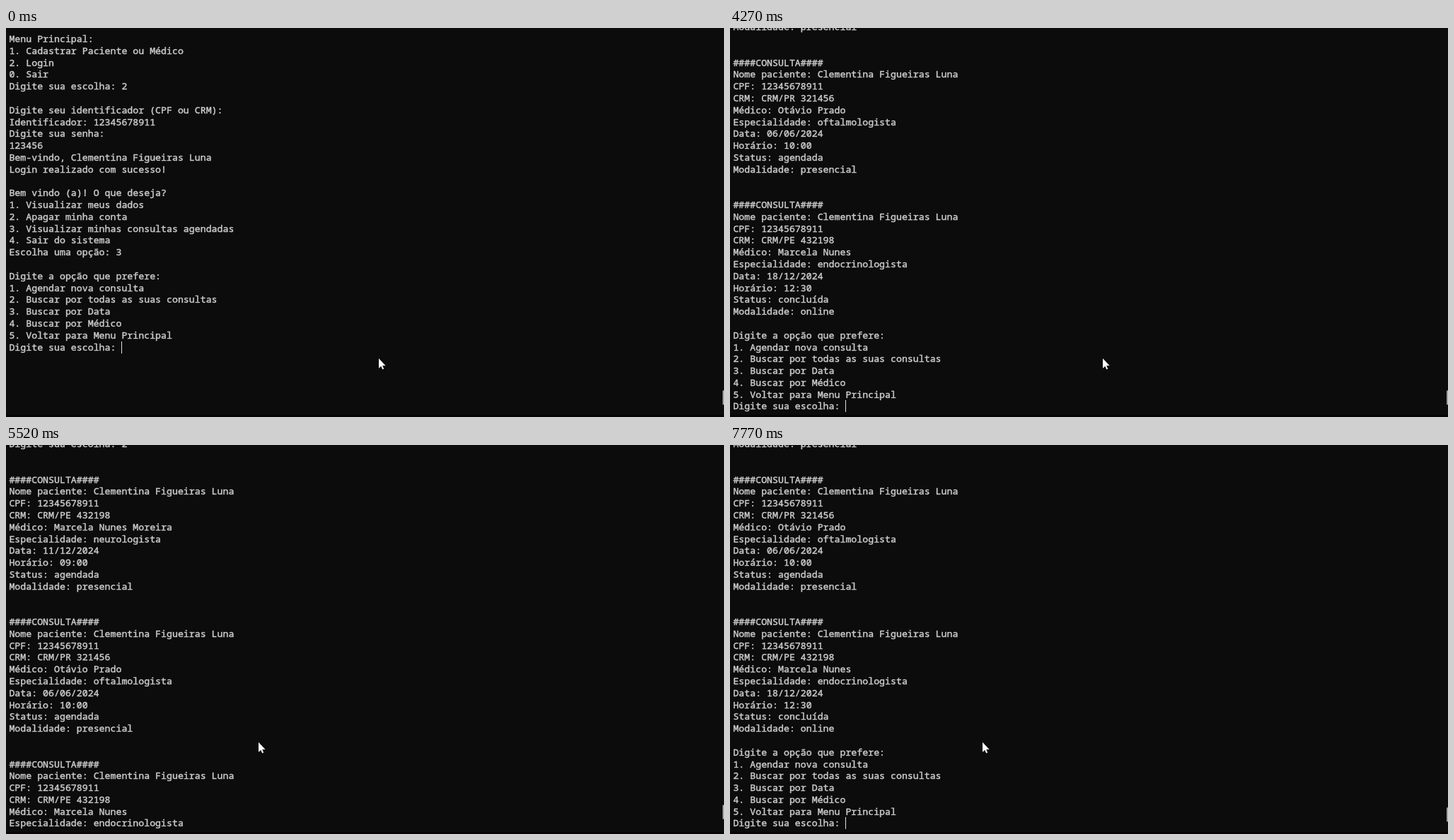
Write an HTML page with a canvas that moves like this. It is 1015 by 551 pixels and loops after 8000 ms.

```html
<!DOCTYPE html>
<html lang="pt-BR">
<head>
<meta charset="utf-8">
<title>Terminal</title>
<style>
  html, body { margin: 0; width: 100%; height: 100%; overflow: hidden; background: #0c0c0c; }
  canvas { display: block; }
</style>
</head>
<body>
<canvas id="stage" width="1015" height="551"></canvas>
<script>
const canvas = document.getElementById('stage');
const ctx = canvas.getContext('2d');
const LOOP = 8000;
const LEFT = 4.4, TOP = 7, ROW = 16.79, CELL = 7.95, BASELINE = 13;
const ROWS = 32;
const PROMPT = 'Digite sua escolha: ';

// Key moments in ms
const TYPED = 1690, LISTED = 3070, MOVED = 4270, WHEEL_UP = 4930, WHEEL_DOWN = 6500;

const patient = 'Clementina Figueiras Luna';
const cpf = '12345678911';

const options = [
  'Digite a opção que prefere:',
  '1. Agendar nova consulta',
  '2. Buscar por todas as suas consultas',
  '3. Buscar por Data',
  '4. Buscar por Médico',
  '5. Voltar para Menu Principal',
];

const session = [
  'Menu Principal:',
  '1. Cadastrar Paciente ou Médico',
  '2. Login',
  '0. Sair',
  PROMPT + '2',
  '',
  'Digite seu identificador (CPF ou CRM):',
  'Identificador: ' + cpf,
  'Digite sua senha:',
  '123456',
  'Bem-vindo, ' + patient,
  'Login realizado com sucesso!',
  '',
  'Bem vindo (a)! O que deseja?',
  '1. Visualizar meus dados',
  '2. Apagar minha conta',
  '3. Visualizar minhas consultas agendadas',
  '4. Sair do sistema',
  'Escolha uma opção: 3',
  '',
  ...options,
];

const appointment = (crm, doctor, specialty, date, hour, status, mode) => [
  '', '',
  '####CONSULTA####',
  'Nome paciente: ' + patient,
  'CPF: ' + cpf,
  'CRM: ' + crm,
  'Médico: ' + doctor,
  'Especialidade: ' + specialty,
  'Data: ' + date,
  'Horário: ' + hour,
  'Status: ' + status,
  'Modalidade: ' + mode,
];

const results = [
  ...session, PROMPT + '2',
  ...appointment('CRM/PE 432198', 'Marcela Nunes Moreira', 'neurologista', '11/12/2024', '09:00', 'agendada', 'presencial'),
  ...appointment('CRM/PR 321456', 'Otávio Prado', 'oftalmologista', '06/06/2024', '10:00', 'agendada', 'presencial'),
  ...appointment('CRM/PE 432198', 'Marcela Nunes', 'endocrinologista', '18/12/2024', '12:30', 'concluída', 'online'),
  '', ...options, PROMPT,
];

const lerp = (a, b, u) => a + (b - a) * u;

// The caret stays lit after each output, then blinks evenly.
function caretLit(t) {
  const lastOutput = t >= LISTED ? LISTED : t >= TYPED ? TYPED : -220;
  const blink = Math.floor((t - lastOutput - 650) / 545);
  return blink < 0 || blink % 2 === 1;
}

// Each wheel notch scrolls three rows; the way back opens with a double notch.
function scrollRows(t) {
  const up = Math.floor((t - WHEEL_UP) / 194) + 1;
  const down = t < WHEEL_DOWN ? 0 : Math.floor((t - WHEEL_DOWN) / 317) + 2;
  return 3 * Math.max(0, Math.min(up, 6) - down);
}

// The pointer hides while typing, then swings right and back to the left in four jumps.
function mousePosition(t) {
  if (t >= TYPED && t < MOVED) return null;
  const u = Math.max(0, Math.min(1, Math.floor((t - MOVED) / 122) / 4));
  return [
    lerp(527, 357, u) + 94 * Math.sin(2 * Math.PI * u),
    lerp(468, 421, u * (2 - u)),
  ];
}

function drawText(text, row) {
  const y = TOP + row * ROW + BASELINE;
  ctx.fillText(text, LEFT, y);
  ctx.strokeText(text, LEFT, y);
}

function drawCaret(column, row) {
  ctx.fillStyle = '#e0e0e0';
  ctx.fillRect(Math.floor(LEFT + column * CELL), Math.round(TOP + row * ROW), 1, 17);
}

function drawMouse([x, y]) {
  ctx.save();
  ctx.translate(x, y);
  ctx.fillStyle = '#fff';
  ctx.fill(new Path2D('M0 0V14L3.2 11L5.2 15.6L7.2 14.7L5.2 10.2H9.6Z'));
  ctx.restore();
}

function draw(t) {
  const lines = t >= LISTED ? results : [...session, PROMPT + (t >= TYPED ? '2' : '')];
  const scroll = scrollRows(t);
  const first = Math.max(0, lines.length - ROWS) - scroll;

  ctx.fillStyle = '#0c0c0c';
  ctx.fillRect(0, 0, canvas.width, canvas.height);
  ctx.fillStyle = '#080304';
  ctx.fillRect(0, 548, canvas.width, 3);

  ctx.font = '500 13.25px "Noto Sans Mono", "DejaVu Sans Mono", monospace';
  ctx.fillStyle = ctx.strokeStyle = '#cccccc';
  ctx.lineWidth = 0.45;
  ctx.lineJoin = 'round';
  for (let row = -1; row < ROWS; row++) {
    const text = lines[first + row];
    if (text) drawText(text, row);
  }

  if (caretLit(t) && !scroll) {
    const last = lines.length - 1;
    drawCaret(lines[last].length, last - first);
  }

  ctx.fillStyle = '#9f9f9f';
  ctx.fillRect(1013, 513.5 - scroll * 0.3, 2, 20);

  const mouse = mousePosition(t);
  if (mouse) drawMouse(mouse);
}

function tick() {
  draw(performance.now() % LOOP);
  requestAnimationFrame(tick);
}
tick();
</script>
</body>
</html>
```
